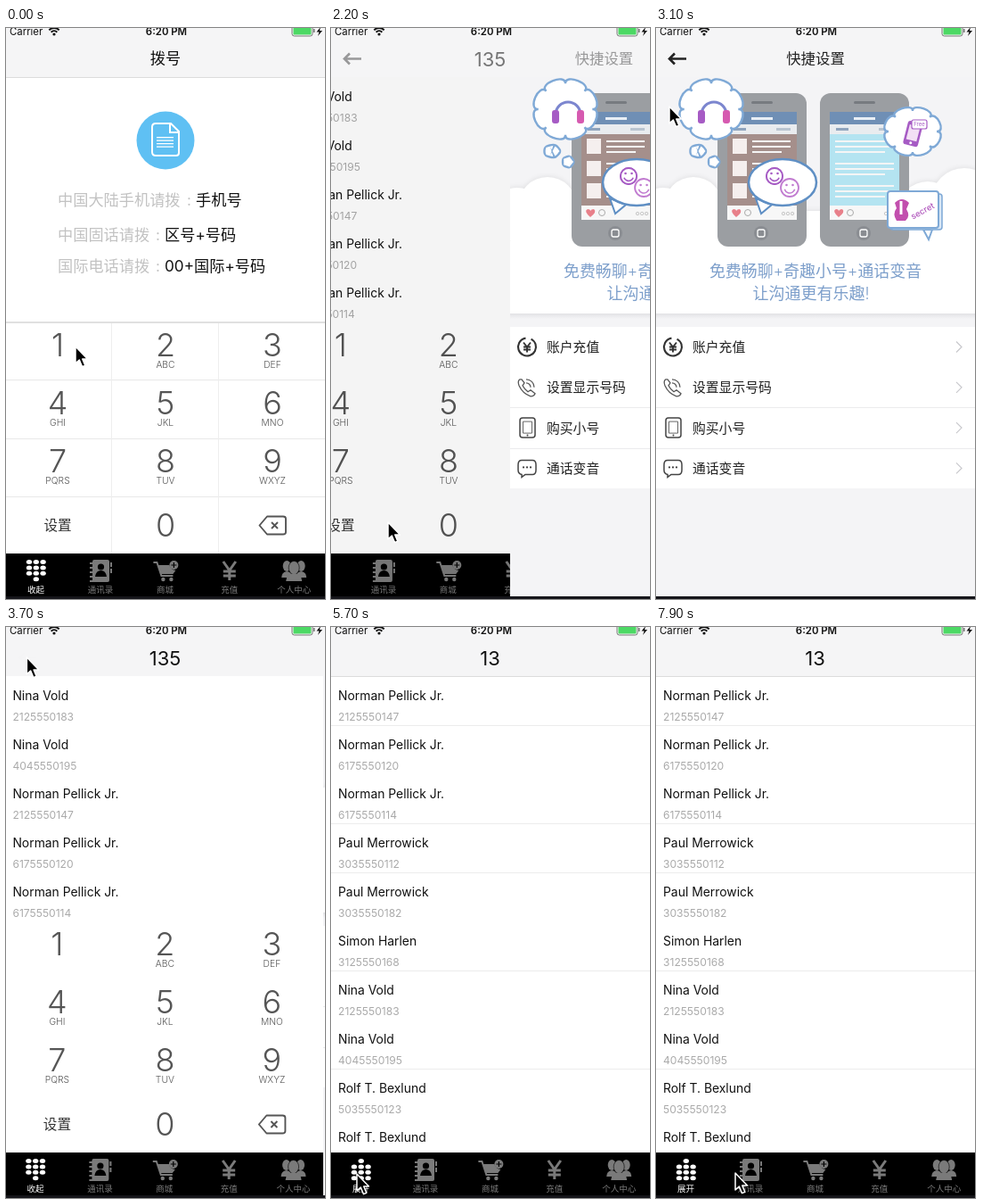
These frames come from a looping animation (358x640 px, 8000 ms). An HTML page with a canvas:

```html
<!DOCTYPE html>
<html lang="zh-CN">
<head>
<meta charset="utf-8">
<title>拨号</title>
<style>
html, body { margin: 0; width: 100%; height: 100%; overflow: hidden; background: #fff; }
canvas { display: block; width: 358px; height: 640px; }
</style>
</head>
<body>
<canvas id="stage"></canvas>
<script>
const W = 358, H = 640, LOOP = 8000, STEP = 100;
const canvas = document.getElementById('stage');
const c = canvas.getContext('2d');
const dpr = window.devicePixelRatio || 1;
canvas.width = W * dpr;
canvas.height = H * dpr;

const clamp = v => Math.max(0, Math.min(1, v));
const easeOut = v => 1 - (1 - v) ** 3;
const easeInOut = v => v * v * (3 - 2 * v);

// Drawing helpers
function text(str, x, y, size, color, { weight = 400, align = 'left' } = {}) {
  c.font = `${weight} ${size}px Inter, "Noto Sans CJK SC", "Noto Sans CJK", sans-serif`;
  c.textAlign = align;
  c.fillStyle = color;
  c.fillText(str, x, y + size * 0.365);
}
const centered = (str, x, y, size, color, weight) =>
  text(str, x, y, size, color, { weight, align: 'center' });
function rect(x, y, w, h, color) {
  c.fillStyle = color;
  c.fillRect(x, y, w, h);
}
function paint(fill, stroke, width = 1.5) {
  if (fill) { c.fillStyle = fill; c.fill(); }
  if (stroke) { c.strokeStyle = stroke; c.lineWidth = width; c.stroke(); }
}
function round(x, y, w, h, r, fill, stroke, width) {
  c.beginPath();
  c.roundRect(x, y, w, h, r);
  paint(fill, stroke, width);
}
function oval(x, y, rx, ry, fill, stroke, width) {
  c.beginPath();
  c.ellipse(x, y, rx, ry, 0, 0, Math.PI * 2);
  paint(fill, stroke, width);
}
const disc = (x, y, r, fill, stroke, width) => oval(x, y, r, r, fill, stroke, width);
function arc(x, y, r, from, to, color, width) {
  c.beginPath();
  c.arc(x, y, r, from * Math.PI, to * Math.PI);
  paint(null, color, width);
}
function shape(d, fill, stroke, width = 1.5) {
  const p = new Path2D(d);
  if (fill) { c.fillStyle = fill; c.fill(p); }
  if (stroke) { c.strokeStyle = stroke; c.lineWidth = width; c.stroke(p); }
}
function at(x, y, draw) {
  c.save();
  c.translate(x, y);
  draw();
  c.restore();
}
function cloud(x, y, rx, ry, lobes, color) {
  const point = (i, k) => {
    const a = i / lobes * Math.PI * 2;
    return [x + Math.cos(a) * rx * k, y + Math.sin(a) * ry * k];
  };
  c.beginPath();
  c.moveTo(...point(0, 0.82));
  for (let i = 0; i < lobes; i++)
    c.bezierCurveTo(...point(i - 0.02, 1.16), ...point(i + 1.02, 1.16), ...point(i + 1, 0.82));
  paint('#fff', color, 2.4);
}

// Contacts
const norman = 'Norman Pellick Jr.', paul = 'Paul Merrowick', nina = 'Nina Vold';
const simon = ['Simon Harlen', '3125550168'];
const normans = ['2125550147', '6175550120', '6175550114'].map(n => [norman, n]);
const pauls = ['3035550112', '3035550182'].map(n => [paul, n]);
const ninas = ['2125550183', '4045550195'].map(n => [nina, n]);
const rolfs = ['5035550123', '5035550176'].map(n => ['Rolf T. Bexlund', n]);
const wide = [...ninas, ...normans, ...pauls, simon, ...rolfs];
const narrow = [...normans, ...pauls, simon, ...ninas, ...rolfs];

// Timeline
const typed = [[0, ''], [200, '1'], [900, '13'], [1500, '135'], [4600, '13']];
const presses = [[100, 0], [900, 2], [1500, 4], [1900, 9], [4600, 11]];
const toggles = [5500, 6200, 6600, 7000, 7500];
const track = [
  [0, 78, 357], [300, 80, 360], [800, 300, 357], [1000, 297, 360], [1100, 272, 388],
  [1400, 186, 424], [1600, 182, 428], [1800, 64, 554], [2600, 64, 554], [3100, 15, 88],
  [3300, 22, 34], [3900, 24, 34], [4400, 305, 556], [4700, 305, 556], [4800, 298, 577],
  [5400, 29, 613], [5900, 29, 613], [6100, 32, 615], [7600, 32, 615], [7900, 89, 612], [8000, 89, 612]
];

function keypadDrop(t) {
  let drop = 0;
  toggles.forEach((start, i) => {
    if (t < start) return;
    const closing = i % 2 === 0;
    const p = easeInOut(clamp((t - start) / (closing ? 200 : 300)));
    drop = closing ? p : 1 - p;
  });
  return drop;
}
function pushProgress(t) {
  return t < 3300 ? easeOut(clamp((t - 2130) / 400)) : 1 - easeOut(clamp((t - 3330) / 450));
}
function cursorAt(t) {
  const i = track.findIndex(k => k[0] > t);
  const [t0, x0, y0] = track[i - 1], [t1, x1, y1] = track[i];
  const p = (t - t0) / (t1 - t0);
  return [x0 + (x1 - x0) * p, y0 + (y1 - y0) * p];
}

// Dial page
function hints() {
  disc(179, 126, 32.5, '#5fc0f3');
  shape('M168 107H185L194 116V140Q194 143 191 143H168Q164 143 164 139V111Q164 107 168 107ZM184 107V117H194', null, '#fff', 2);
  for (let y = 122; y < 136; y += 3.5) rect(169, y, 19, 1.3, '#fff');
  const rows = [['中国大陆手机请拨', '手机号', 213, 193], ['中国固话请拨', '区号+号码', 178, 232],
    ['国际电话请拨', '00+国际+号码', 178, 267]];
  for (const [label, value, x, y] of rows) {
    text(label, 58, y, 17.2, '#c2c2c2');
    text(':', x - 10, y, 17, '#c2c2c2');
    text(value, x, y, 17.2, '#111');
  }
}
function contacts(rows, ruled) {
  rows.forEach(([name, number], i) => {
    text(name, 8, 77 + i * 55, 13.9, '#111');
    text(number, 8, 101 + i * 55, 12.1, '#aaa');
  });
  if (ruled) for (const y of [110, 220, 275, 385, 495]) rect(0, y, W, 1, '#ececec');
}
const keys = ['1', '2 ABC', '3 DEF', '4 GHI', '5 JKL', '6 MNO', '7 PQRS', '8 TUV', '9 WXYZ', '设置', '0', ''];
const colX = [0, 118, 238, W], rowY = [330, 394, 460, 525, 590];
function keypad(pressed, ruled) {
  rect(0, 330, W, 260, '#fff');
  keys.forEach((key, i) => {
    const col = i % 3, row = Math.floor(i / 3), x = [58, 179, 299][col];
    if (i === pressed)
      rect(colX[col], rowY[row], colX[col + 1] - colX[col], rowY[row + 1] - rowY[row], '#e4e4e4');
    const [digit, letters = ''] = key.split(' ');
    if (i === 9) centered(digit, x, 557, 15.6, '#333', 500);
    else centered(digit, x, row < 3 ? 355 + row * 65 : 557, 36, '#555', 300);
    centered(letters, x, 377 + row * 65, 10.3, '#555', 300);
  });
  c.lineJoin = 'round';
  shape('M293 547.5H311Q314 547.5 314 550V565Q314 567.5 311 567.5H293L284.5 557.5ZM298 554L305 561M305 554L298 561', null, '#555', 1.9);
  c.lineJoin = 'miter';
  if (!ruled) return;
  for (const y of rowY.slice(1, 4)) rect(0, y, W, 1, '#e8e8e8');
  for (const x of colX.slice(1, 3)) rect(x, 330, 1, 260, '#eeeeee');
  rect(0, 329, W, 2, '#e0e0e0');
}

// Tab bar
function dialIcon(open) {
  for (let row = 0; row < 4; row++)
    for (let col = 0; col < 3; col++)
      if (row !== (open ? 3 : 0) || col === 1)
        oval(26 + col * 7.8, 598.5 + row * 6.4, 3.2, 2.5, '#fff');
}
function bookIcon(color) {
  round(-9, -12, 19, 25, 2, color);
  for (let y = -9; y < 12; y += 5) rect(-12, y, 5, 2, color);
  disc(0.5, -4, 3.6, '#000');
  shape('M-6 7Q-5 0 0.5 0Q6 0 7 7Z', '#000');
  rect(11, -9, 2, 5, color);
  rect(11, -2, 2, 5, color);
}
function cartIcon(color) {
  shape('M-13 -9H-9L-4 6H9', null, color, 2);
  shape('M-8 -6H5Q6 -1 12 0L9 4H-5Z', color);
  disc(-2, 10, 2.2, color);
  disc(7, 10, 2.2, color);
  disc(10, -6, 5, color);
  shape('M7 -6H13M10 -9V-3', null, '#000', 1.2);
}
function yuanIcon(color) {
  shape('M-7 -10L0 0L7 -10M0 0V11M-7 1H7M-7 6H7', null, color, 3);
}
function peopleIcon(color) {
  for (const x of [-8, 8]) {
    oval(x, -5, 4.5, 6, color);
    shape(`M${x - 6} 8Q${x - 6} 2 ${x} 1Q${x + 6} 2 ${x + 6} 8Z`, color);
  }
  oval(0, -3, 6, 7.5, color, '#000', 0.6);
  shape('M-9 12Q-9 4 0 3Q9 4 9 12Z', color);
}
const tabs = [['通讯录', bookIcon], ['商城', cartIcon], ['充值', yuanIcon], ['个人中心', peopleIcon]];
function tab([label, icon], x, color) {
  at(x, 608, () => icon(color));
  centered(label, x, 630, 9.5, color);
}
function tabBar(open, calling) {
  rect(0, 589, W, 51, '#000');
  dialIcon(open);
  centered(open ? '收起' : '展开', 33.5, 630, 9.5, '#fff');
  if (!calling) {
    tabs.forEach((item, i) => tab(item, 106 + i * 72.4, '#7a7a7a'));
    return;
  }
  rect(70, 589, 218, 48, '#4fbd62');
  shape('M158 599Q163 595 166 599L170 605Q171 608 167 611Q173 619 184 623Q188 618 191 619L201 625Q204 628 200 631Q194 634 186 631Q162 622 156 606Q155 602 158 599Z', '#fff');
  tab(tabs[0], 323, '#5c5c5c');
}

function dialPage(t, entry, ruled) {
  const drop = keypadDrop(t);
  const open = toggles.filter(s => t > s).length % 2 === 0;
  const press = presses.find(([start]) => t >= start && t < start + 100);
  rect(0, 55, W, 535, '#fff');
  if (entry) contacts(entry === '13' ? narrow : wide, ruled);
  else hints();
  if (drop < 1) at(0, drop * 260, () => keypad(press ? press[1] : -1, ruled));
  tabBar(open, entry && open && (t < 2130 || t >= 4000));
}

// Settings page
const blue = '#7fa9d6', purple = '#a65bc4';
function handset(x, body, list) {
  round(x, 73, 100, 172, 12, '#9b9ea2');
  round(x + 38, 82, 24, 3, 1.5, '#777b80');
  rect(x + 11, 94, 78, 121, body);
  rect(x + 11, 94, 78, 14, '#6f8fb5');
  rect(x + 38, 100, 24, 3, '#e8eef5');
  rect(x + 11, 108, 78, 11, '#e9ecef');
  rect(x + 18, 112, 14, 3, '#8fa4bd');
  rect(x + 66, 112, 16, 3, '#b9c4d0');
  for (let i = 0; i < 3; i++) {
    if (list) rect(x + 17, 124 + i * 25, 16, 17, '#f5efee');
    for (let k = 0; k < 3; k++)
      rect(x + (list ? 39 : 17), 126 + i * 25 + k * 6, (list ? 43 : 66) - (k === 2 ? 10 : 0), 2, '#f5f5f5');
  }
  rect(x + 11, 199, 78, 16, '#f7f7f7');
  shape(`M${x + 21} 212Q${x + 13} 205 ${x + 18} 203Q${x + 21} 203 ${x + 21} 205Q${x + 22} 203 ${x + 25} 203Q${x + 29} 206 ${x + 21} 212Z`, '#e8808a');
  disc(x + 34, 207, 3.5, null, '#aaa', 1);
  for (const dx of [74, 79, 84]) disc(x + dx, 208, 1.7, null, '#bbb', 0.8);
  disc(x + 49, 230, 8, '#8a8d92');
  round(x + 45, 226, 8, 8, 2, null, '#fff', 1.3);
}
function smiley(x, y, r, color) {
  disc(x, y, r, '#fff', color, 1.8);
  disc(x - 3.5, y - 3, 1.3, color);
  disc(x + 3.5, y - 3, 1.3, color);
  arc(x, y, r * 0.6, 0.1, 0.9, color, 1.6);
}
function illustration() {
  c.save();
  c.shadowColor = 'rgba(0,0,0,.10)';
  c.shadowBlur = 6;
  c.beginPath();
  c.rect(0, 205, W, 115);
  for (const [x, y, r] of [[8, 209, 30], [42, 200, 33], [80, 222, 28], [265, 220, 28], [305, 205, 33], [346, 194, 37]]) {
    c.moveTo(x + r, y);
    c.arc(x, y, r, 0, Math.PI * 2);
  }
  paint('#fff');
  c.restore();
  handset(69, '#a58f8b', true);
  handset(184, '#b4e4f1', false);

  cloud(62, 91, 37, 35, 8, blue);
  arc(65, 97, 14, 1, 2, '#7c86cf', 3);
  round(47, 92, 8, 15, 3, purple);
  round(75, 92, 8, 15, 3, '#d65ab0');
  cloud(47, 138, 10, 8, 5, blue);
  cloud(65, 150, 7, 7, 5, blue);

  shape('M112 191L118 208L130 198Z', '#fff', '#5f8fc4', 2);
  oval(142, 173, 38, 26, '#fff', '#5f8fc4', 2.5);
  disc(133, 166, 10, purple);
  smiley(133, 166, 9, purple);
  smiley(150, 179, 10, '#c17bd0');

  cloud(288, 116, 33, 28, 8, blue);
  at(288, 118, () => {
    c.rotate(0.25);
    round(-8, -13, 17, 27, 3, purple);
    rect(-5.5, -9, 12, 17, '#f3dff5');
    disc(0.5, 11, 1.5, '#fff');
  });
  round(287, 103, 17, 10, 2, '#fff', purple, 1.2);
  centered('Free', 295.5, 108, 6, purple);

  shape('M300 226L306 237L310 226Z', '#fff', blue, 2);
  round(263, 186, 58, 40, 3, '#d9e7f5', blue, 1.5);
  round(260, 183, 57, 41, 3, '#fff', blue, 2);
  shape('M268 196Q276 188 284 196L281 203Q286 211 280 216H270Q265 208 270 202Z', '#c24fae');
  shape('M275 194V209', null, '#fff', 3);
  at(299, 205, () => {
    c.rotate(-0.5);
    centered('secret', 0, 0, 9.5, '#b057bd', 500);
  });
  centered('免费畅聊+奇趣小号+通话变音', 179, 272, 17.9, '#7d9fcb', 300);
  centered('让沟通更有乐趣!', 174, 297, 18, '#7d9fcb', 300);
}
const settings = [
  ['账户充值', () => {
    arc(0, 0, 10, -0.35, 1.45, '#333', 2.1);
    shape('M-4 -5L0 0L4 -5M0 0V6M-4 0H4M-4 3H4', null, '#333', 1.9);
  }],
  ['设置显示号码', () => {
    shape('M-8 -9Q-11 -7 -9 -2Q-5 7 4 10Q8 10 9 7L4 3L1 5Q-3 2 -5 -2L-3 -5L-6 -9Z', null, '#555', 1.3);
    arc(-1, 0, 5, -0.5, 0, '#555', 1.2);
    arc(-1, 0, 9, -0.5, 0, '#555', 1.2);
  }],
  ['购买小号', () => {
    round(-8, -11, 17, 22, 3, null, '#444', 1.5);
    round(-4.5, -7, 10, 13, 0, null, '#666', 1);
    disc(0.5, 8.5, 1, '#444');
  }],
  ['通话变音', () => {
    shape('M-6 -9H6Q10 -9 10 -4V2Q10 7 6 7H-2L-6 10V7Q-10 6 -10 2V-4Q-10 -9 -6 -9Z', null, '#444', 1.5);
    for (const x of [-4, 0, 4]) disc(x, -1, 1.1, '#444');
  }]
];
function settingsPage() {
  c.beginPath();
  c.rect(0, 55, W, 585);
  c.clip();
  rect(0, 55, W, 585, '#f4f4f6');
  illustration();
  const fade = c.createLinearGradient(0, 320, 0, 326);
  fade.addColorStop(0, '#e2e2e5');
  fade.addColorStop(1, '#f4f4f6');
  rect(0, 320, W, 15, '#f4f4f6');
  rect(0, 320, W, 6, fade);
  rect(0, 335, W, 181, '#fff');
  settings.forEach(([label, icon], i) => {
    const y = 357.5 + i * 45.3;
    at(19, y, icon);
    text(label, 41, y, 14.8, '#222', { weight: 500 });
    shape(`M337 ${y - 6}L343 ${y}L337 ${y + 6}`, null, '#c8c8cc', 1.2);
  });
  for (const y of [425, 471]) rect(0, y, W, 1, '#ebebed');
}

// Fixed chrome
function statusBar() {
  text('Carrier', 4, 4, 11.4, '#111');
  arc(54, 8, 8, 1.25, 1.75, '#111', 2);
  arc(54, 8, 4.7, 1.25, 1.75, '#111', 2);
  disc(54, 7, 1.6, '#111');
  centered('6:20 PM', 180, 4, 11.4, '#111', 600);
  round(321, -3, 23, 12, 2.5, null, '#777', 1);
  rect(322.5, -1, 20, 8.5, '#4cd964');
  rect(345, 1, 1.5, 4, '#777');
  shape('M353 -1L348.5 4.5H351.5L350 9L355 3H352Z', '#111');
}
function navBar(entry, push) {
  rect(0, 0, W, 55, '#f5f5f6');
  if (push === 0) rect(0, 55, W, 1, '#dcdcdc');
  c.globalAlpha = 1 - push;
  if (entry) centered(entry, 178.5, 35, 22, '#111');
  else centered('拨号', 179, 34, 17.2, '#111', 500);
  c.globalAlpha = push;
  centered('快捷设置', 179 + (1 - push) * 227, 34, 16.4, '#222', 500);
  shape('M34 34.5H15M21 28.5L15 34.5L21 40.5', null, '#222', 2.6);
  c.globalAlpha = 1;
}
function cursor(x, y) {
  at(x, y, () => {
    c.scale(1.08, 1.08);
    c.lineJoin = 'round';
    shape('M0 0V17.5L4 14L7 21L10 19.7L7.2 13H12.5Z', '#000', '#fff', 1.4);
  });
}

function render(t) {
  const entry = typed.filter(([start]) => t >= start).pop()[1];
  const push = pushProgress(t);
  c.setTransform(dpr, 0, 0, dpr, 0, 0);
  rect(0, 0, W, H, '#f4f4f6');
  if (push < 1) at(-0.3 * W * push, 0, () => dialPage(t, entry, push === 0));
  if (push > 0) {
    rect(0, 55, W, 585, `rgba(0,0,0,${0.1 * push})`);
    at(W * (1 - push), 0, settingsPage);
  }
  navBar(entry, push);
  statusBar();
  rect(0, 637, W, 3, '#15151a');
  cursor(...cursorAt(t));
}

let origin;
function tick(now) {
  origin ??= now;
  render(Math.floor((now - origin) % LOOP / STEP) * STEP);
  requestAnimationFrame(tick);
}
render(0);
requestAnimationFrame(tick);
</script>
</body>
</html>
```
